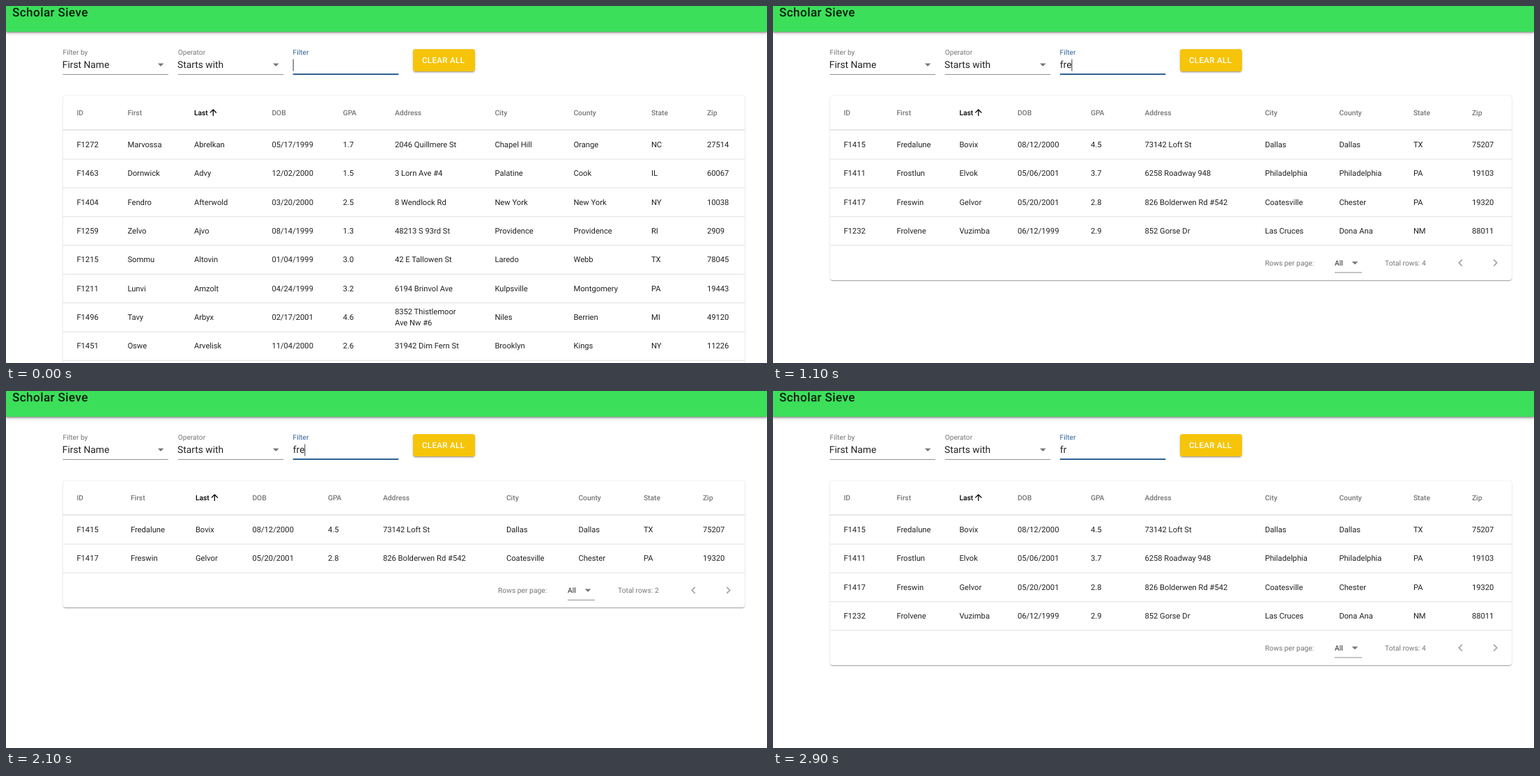
An HTML page for the animation above (3.2 s loop, 1092x513 px).

```html
<!DOCTYPE html>
<html lang="en">
<head>
<meta charset="utf-8">
<title>Scholar Sieve</title>
<style>
  html, body { margin: 0; width: 100%; height: 100%; overflow: hidden; background: #fff; }
  div, svg { position: absolute; }
  svg { left: 0; top: 0; font-family: Roboto, Arial, sans-serif; }
  text { white-space: pre; text-rendering: geometricPrecision; }
  #bar {
    left: 0; top: 0; width: 1092px; height: 36.5px; background: #3cdf5a;
    box-shadow: 0 1px 2px #0005, 0 2px 4px #0003, 0 .9px 8.6px #0000001a;
  }
  #card {
    left: 81.5px; top: 128.5px; width: 978.5px; border-radius: 3.4px; background: #fff;
    box-shadow: 0 1.7px .9px -.9px #0003, 0 .9px .9px #00000024, 0 0 1px #0003, 0 .9px 2.6px #0000001f;
  }
  #button {
    left: 583.6px; top: 61.8px; width: 89px; height: 31.8px; border-radius: 3.4px; background: #f6c408;
    box-shadow: 0 2.6px .9px -1.7px #0003, 0 1.7px 1.7px #00000024, 0 .9px 4.3px #0000001f;
  }
  .title { font-size: 17.2px; font-weight: 500; letter-spacing: .36px; }
  .label { font-size: 10.1px; letter-spacing: .05px; }
  .value { font-size: 13.8px; }
  .head { font-size: 10.3px; font-weight: 500; }
  .cell { font-size: 11.2px; }
  .small { font-size: 10.3px; }
  .button { font-size: 11.6px; font-weight: 500; letter-spacing: .3px; }
</style>
</head>
<body>
<div id="bar"></div>
<div id="card"></div>
<div id="button"></div>
<svg width="1092" height="513">
  <g id="form"></g>
  <g id="table"></g>
  <text id="typed" class="value" x="411.8" y="89" fill="#000000de"></text>
  <rect id="caret" y="76.5" width="1" height="17" fill="#2b3a4a"/>
</svg>
<script>
const DARK = '#000000de', GREY = '#0000008a', BLUE = '#2f6196';
const LOOP = 3200, HEAD_END = 178.5, ROW = 41.33, FOOT = 50;

const heads = 'ID,First,Last,DOB,GPA,Address,City,County,State,Zip'.split(',');

// Sorted by last name; "/" breaks a line.
const records = `
F1272|Marvossa|Abrelkan|05/17/1999|1.7|2046 Quillmere St|Chapel Hill|Orange|NC|27514
F1463|Dornwick|Advy|12/02/2000|1.5|3 Lorn Ave #4|Palatine|Cook|IL|60067
F1404|Fendro|Afterwold|03/20/2000|2.5|8 Wendlock Rd|New York|New York|NY|10038
F1259|Zelvo|Ajvo|08/14/1999|1.3|48213 S 93rd St|Providence|Providence|RI|2909
F1215|Sommu|Altovin|01/04/1999|3.0|42 E Tallowen St|Laredo|Webb|TX|78045
F1211|Lunvi|Amzolt|04/24/1999|3.2|6194 Brinvol Ave|Kulpsville|Montgomery|PA|19443
F1496|Tavy|Arbyx|02/17/2001|4.6|8352 Thistlemoor/Ave Nw #6|Niles|Berrien|MI|49120
F1451|Oswe|Arvelisk|11/04/2000|2.6|31942 Dim Fern St|Brooklyn|Kings|NY|11226
F1415|Fredalune|Bovix|08/12/2000|4.5|73142 Loft St|Dallas|Dallas|TX|75207
F1411|Frostlun|Elvok|05/06/2001|3.7|6258 Roadway 948|Philadelphia|Philadelphia|PA|19103
F1220|Flandrel|Fimzo|05/15/1999|4.6|617 Woldemarch Blvd|Rockford|Winnebago|IL|61109
F1417|Freswin|Gelvor|05/20/2001|2.8|826 Bolderwen Rd #542|Coatesville|Chester|PA|19320
F1499|Fenzo|Hovelta|02/24/2001|3.9|2918 Tarnfell Rd #8037|Denver|Lancaster|PA|17517
F1346|Foldessa|Jorvell|03/04/2000|2.6|27935 Old Us Roadway 86|Preston|Caroline|MD|21655
F1367|Fovvie|Lombrik|04/22/2000|4.7|29 Us Roadway 444|Round Rock|Williamson|TX|78664
F1232|Frolvene|Vuzimba|06/12/1999|2.9|852 Gorse Dr|Las Cruces|Dona Ana|NM|88011
`.trim().split('\n').map(line => line.split('|'));

// Column positions for each query.
const columns = {
  '': [102, 175, 270.5, 382, 484, 558.5, 702, 815, 926.5, 1006.5],
  f: [102, 176, 265.5, 363.5, 466, 541.5, 715, 819, 923, 1005],
  fr: [102, 178, 268, 351.5, 456.5, 534, 706.5, 813, 919.5, 1003.5],
  fre: [102, 179.5, 272.5, 354, 462.5, 541.5, 718.5, 822, 915.5, 1000.5],
  fred: [102, 186.5, 288, 375.5, 493.5, 580.5, 712.5, 797.5, 900, 993.5]
};

// The table answers a little after each key.
const typing = [[0, ''], [900, 'f'], [1000, 'fr'], [1100, 'fre'], [1400, 'fred'], [1800, 'fre'], [2400, 'fr']];
const results = [[0, ''], [1000, 'f'], [1100, 'fr'], [1200, 'fre'], [1400, 'fred'], [1900, 'fre'], [2500, 'fr']];
const caretOff = [[200, 700], [2900, LOOP]];

const $ = id => document.getElementById(id);
const at = (steps, t) => steps.filter(([start]) => start <= t).pop()[1];
const text = (kind, x, y, str, fill = DARK) =>
  `<text class="${kind}" x="${x}" y="${y}" fill="${fill}">${str}</text>`;
const line = (x1, x2, y, color, width = 1) =>
  `<path d="M${x1} ${y}H${x2}" stroke="${color}" stroke-width="${width}"/>`;
const icon = (x, y, scale, d, fill) =>
  `<path transform="translate(${x} ${y}) scale(${scale}) translate(-12 -12)" d="${d}" fill="${fill}"/>`;
const dropArrow = (x, y) => icon(x, y, .86, 'M7 9.5l5 5 5-5z', '#757575');

function drawForm() {
  const select = (x, label, value) =>
    text('label', x, 70, label, GREY) + text('value', x - .7, 89, value) +
    line(x, x + 151.5, 98.4, '#8c8c8c') + dropArrow(x + 140.6, 84.7);
  $('form').innerHTML =
    text('title', 9, 14.8, 'Scholar Sieve') +
    select(81.5, 'Filter by', 'First Name') +
    select(246.7, 'Operator', 'Starts with') +
    text('label', 411.6, 70, 'Filter', BLUE) +
    line(411.8, 563.3, 98, BLUE, 1.8) +
    text('button', 597, 81.7, 'CLEAR ALL', '#fff');
}

function drawCell(x, y, str) {
  const parts = str.split('/');
  if (parts.length !== 2) return text('cell', x, y, str);
  return text('cell', x, y - 8, parts[0]) + text('cell', x, y + 8, parts[1]);
}

function drawFooter(y, count) {
  const left = 'M15.41 7.41 14 6l-6 6 6 6 1.41-1.41L10.83 12z';
  const right = 'M10 6 8.59 7.41 13.17 12l-4.58 4.59L10 18l6-6z';
  return text('small', 706, y + 3.7, 'Rows per page:', GREY) +
    text('small', 806, y + 3.7, 'All') + dropArrow(835, y + .3) +
    line(806, 845, y + 14, '#8c8c8c') +
    text('small', 878, y + 3.7, 'Total rows: ' + count, GREY) +
    icon(986.5, y, .86, left, '#a5a5a5') + icon(1036.5, y, .86, right, '#a5a5a5');
}

function drawTable(query) {
  const xs = columns[query].map(x => x - .6);
  const rows = records.filter(r => r[1].toLowerCase().startsWith(query));
  const end = HEAD_END + rows.length * ROW;
  const arrow = 'M4 12l1.41 1.41L11 7.83V20h2V7.83l5.58 5.59L20 12l-8-8-8 8z';
  let out = heads.map((h, i) => text('head', xs[i], 156.7, h, i === 2 ? '#000' : GREY)).join('') +
    icon(xs[2] + 27.4, 153, .62, arrow, '#000') + line(81.5, 1060, HEAD_END - .5, '#cfcfcf', 1.2);
  rows.forEach((row, n) => {
    const y = 202.9 + n * ROW;
    out += row.map((str, i) => drawCell(xs[i], y, str)).join('') +
      line(81.5, 1060, 220 + n * ROW, '#e0e0e0');
  });
  $('table').innerHTML = out + drawFooter(end + 25.2, rows.length);
  $('card').style.height = end + FOOT + .3 - 128.5 + 'px';
}

let shown = null;
function frame(now) {
  const t = now % LOOP;
  const query = at(results, t), typed = $('typed');
  if (query !== shown) drawTable(shown = query);
  typed.textContent = at(typing, t);
  $('caret').setAttribute('x', 411.7 + typed.getComputedTextLength());
  $('caret').setAttribute('opacity', caretOff.some(([a, b]) => t >= a && t < b) ? 0 : 1);
  requestAnimationFrame(frame);
}

drawForm();
const start = performance.now();
requestAnimationFrame(now => frame(Math.max(0, now - start)));
</script>
</body>
</html>
```
